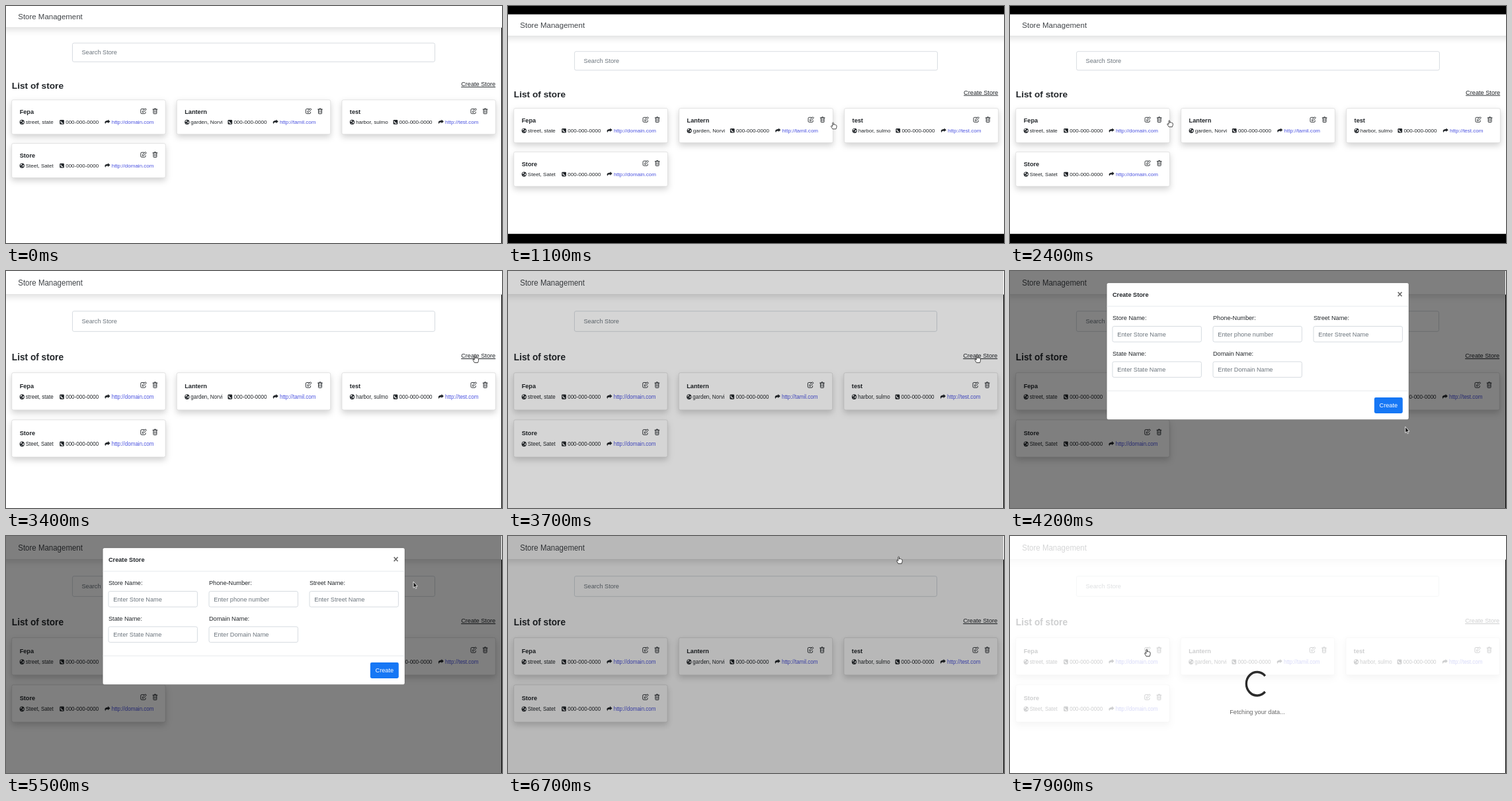
These frames come from a looping animation (750x358 px, 8 s). An HTML page:

```html
<!DOCTYPE html>
<html lang="en">
<head>
<meta charset="utf-8">
<title>Store Management</title>
<style>
  html, body { margin: 0; width: 100%; height: 100%; overflow: hidden; background: #000; }
  svg { display: block; width: 750px; height: 358px; }
  text { font: 9.2px "Liberation Sans", Arial, sans-serif; fill: #212529; }
  .bold { font-weight: bold; }
  .brand { font-size: 11.5px; fill: #404448; }
  .heading { font-size: 13.7px; font-weight: bold; }
  .small { font-size: 8.06px; }
  .url { fill: #4b53e0; }
  .hint { fill: #6c757d; }
  .field { fill: #fff; stroke: #ced4da; stroke-width: .8; }
  .header { fill: #fff; stroke: #d9dadb; stroke-width: .6; filter: drop-shadow(0 4px 4px #0000001c); }
  .card { fill: #fff; stroke: #d8d8d8; stroke-width: .7; filter: drop-shadow(0 4.6px 4.6px #0000002e); }
  .line { fill: none; stroke: #212529; stroke-linecap: round; stroke-linejoin: round; }
  .rule { stroke: #dee2e6; stroke-width: .7; }
  .cursor { stroke-width: .8; stroke-linejoin: round; }
</style>
</head>
<body>
<svg viewBox="0 0 750 358">
  <defs>
    <g id="globe">
      <circle r="3.6" fill="#212529"/>
      <path d="M-1.9-2.3L.2-2.7-.4-1.2-1.7-.2-2.6-1zM.8-.6L2.6-1 2.5.8 1.2 2.2.6.6zM-1.6 1L-.3 1.5-1 2.7z" fill="#fff"/>
    </g>
    <g id="phone">
      <rect x="-3.3" y="-3.4" width="6.7" height="6.7" rx="1.3" fill="#212529"/>
      <path d="M-1.6-1.7C-1.6.2-.2 1.7 1.8 1.7" fill="none" stroke="#fff" stroke-width="1.2"/>
    </g>
    <path id="share" fill="#212529" d="M.9-3.5L4.2-.6.9 2.2V.8C-1.6.7-3 1.2-2.8 3.3-5.2.2-3.4-2 .9-2z"/>
    <g id="edit" class="line">
      <path d="M1-3.3H-2.8Q-4.1-3.3-4.1-2V2.5Q-4.1 3.8-2.8 3.8H1.8Q3.1 3.8 3.1 2.5V1.4" stroke-width=".9"/>
      <path d="M-1.4 1.5L-1.2-.3 3-4 4.4-2.6.3 1.3z" stroke-width=".9"/>
    </g>
    <g id="trash" class="line" stroke-width=".9">
      <path d="M-3.4-2.7H3.4M-1.3-2.8L-.9-3.9H.9L1.3-2.8M-2.5-2.6V3.3Q-2.5 4-1.8 4H1.8Q2.5 4 2.5 3.3V-2.6"/>
      <path d="M-1-.9V2.3M1-.9V2.3" stroke-width=".7"/>
    </g>
  </defs>
  <g id="page">
    <rect width="750" height="360" fill="#fff"/>
    <g id="content"></g>
    <rect id="backdrop" width="750" height="360"/>
    <g id="modal"></g>
    <g id="loader">
      <rect width="750" height="360" fill="#fff" opacity=".78"/>
      <path id="spinner" fill="none" stroke="#2b2b2b" stroke-width="3.3"/>
      <text x="374.6" y="248.8" text-anchor="middle" style="fill:#666">Fetching your data...</text>
    </g>
    <g id="cursor" class="cursor">
      <path id="arrow" d="M0 0V8.6L2 6.9 3.4 9.8 4.8 9.2 3.5 6.4H6.1z" fill="#111" stroke="#fff"/>
      <path id="hand" d="M-.8.8Q0-.5.9.8V3.9L1.1 3Q2.2 2.6 2.7 3.6 3.9 3.1 4.3 4.1 5.5 4 5.5 5.2V7.2L4.5 10H-.6L-2.9 6.4Q-3.2 5-1.9 5.2L-.8 6.2z" fill="#fff" stroke="#222"/>
    </g>
  </g>
  <g id="bars">
    <rect width="750" height="12.6"/>
    <rect y="344.2" width="750" height="14"/>
  </g>
</svg>
<script>
const LOOP = 8000;
const $ = id => document.getElementById(id);
const clamp = v => Math.min(1, Math.max(0, v));
const progress = (t, start, length) => clamp((t - start) / length);
const easeOut = p => 1 - (1 - p) ** 2;
const smooth = p => p * p * (3 - 2 * p);

const label = (x, y, text, cls = '', extra = '') =>
  `<text x="${x}" y="${y}" class="${cls}" ${extra}>${text}</text>`;
const box = (x, y, w, h, cls, r = 2.3) =>
  `<rect x="${x}" y="${y}" width="${w}" height="${h}" rx="${r}" class="${cls}"/>`;
const icon = (name, x, y) => `<use href="#${name}" x="${x}" y="${y}"/>`;

// phoneX is where the phone block starts, measured from the card's left edge
function card(x, y, name, address, phoneX, url) {
  const row = y + 36.6;
  return box(x, y, 232.8, 52, 'card') +
    label(x + 12, y + 21.2, name, 'bold') +
    icon('edit', x + 199.5, y + 17) + icon('trash', x + 217, y + 17) +
    icon('globe', x + 15.6, y + 33.7) + label(x + 21.1, row, address, 'small') +
    icon('phone', x + phoneX + 3.4, y + 33.7) +
    label(x + phoneX + 9.1, row, '000-000-0000', 'small') +
    icon('share', x + phoneX + 72.3, y + 33.3) +
    label(x + phoneX + 78.7, row, url, 'small url');
}

$('content').innerHTML =
  box(-5, -5, 760, 37.6, 'header', 0) +
  label(18.3, 20.2, 'Store Management', 'brand') +
  box(100.6, 56.1, 548.8, 28.3, 'field') +
  label(114.6, 73.4, 'Search Store', 'hint') +
  label(8.8, 125.1, 'List of store', 'heading') +
  label(741.2, 121.1, 'Create Store', '', 'text-anchor="end" text-decoration="underline"') +
  card(8.7, 142, 'Fepa', 'street, state', 72.5, 'http://domain.com') +
  card(258.6, 142, 'Lantern', 'garden, Norvi', 77.2, 'http://tamil.com') +
  card(508.6, 142, 'test', 'harbor, sulmo', 77.7, 'http://test.com') +
  card(8.7, 207.8, 'Store', 'Steet, Satet', 72.5, 'http://domain.com');

const fields = [
  ['Store Name:', 'Enter Store Name'], ['Phone-Number:', 'Enter phone number'],
  ['Street Name:', 'Enter Street Name'], ['State Name:', 'Enter State Name'],
  ['Domain Name:', 'Enter Domain Name'],
];
const rule = y => `<path class="rule" d="M146.7 ${y}H603.8"/>`;

$('modal').innerHTML =
  `<rect x="146.5" y="16.6" width="457.3" height="190.9" rx="2.5" fill="#fff" stroke="#0005" stroke-width=".6"/>` +
  label(155.2, 35.8, 'Create Store', 'bold') +
  label(590.3, 37.2, '×', 'bold', 'text-anchor="middle" style="font-size:13.8px;fill:#666"') +
  rule(49.2) + rule(167.3) +
  fields.map(([name, hint], i) => {
    const x = 155.2 + i % 3 * 152.2, y = Math.floor(i / 3) * 49.4;
    return label(x, y + 68.8, name) + box(x, y + 77.2, 134.6, 21.8, 'field') +
      label(x + 7.4, y + 91.2, hint, 'hint');
  }).join('') +
  `<rect x="551.6" y="176.5" width="43" height="22.2" rx="2.3" fill="#1677f5"/>` +
  label(573.1, 190.7, 'Create', '', 'text-anchor="middle" style="fill:#fff"');

// time, x, y, shape
const route = [
  [700, 722, 48, 'arrow'], [1000, 560, 150, 'hand'], [1300, 300, 200, 'arrow'],
  [1500, 60, 150, 'hand'], [1900, 120, 225, 'hand'], [2200, 262, 190, 'arrow'],
  [2400, 240.8, 160, 'hand'], [2500, 240.8, 160, 'arrow'], [3250, 710, 118, 'hand'],
  [3950, 710, 118, 'arrow'], [4250, 590, 225, 'arrow'], [4700, 420, 150, 'arrow'],
  [5100, 400, 140, 'arrow'], [5500, 616.9, 63.8, 'arrow'], [6000, 600, 47, 'arrow'],
  [6150, 593, 34, 'hand'], [6400, 591.5, 28.6, 'hand'], [6750, 591.5, 28.6, 'arrow'],
  [7500, 206.9, 158, 'hand'], [LOOP, 206.9, 158, 'hand'],
];

function drawCursor(t) {
  const visible = t >= route[0][0];
  $('cursor').style.display = visible ? '' : 'none';
  if (!visible) return;
  const next = route.findIndex(key => key[0] > t);
  const [t0, x0, y0, shape] = route[next - 1], [t1, x1, y1] = route[next];
  const p = smooth(progress(t, t0, t1 - t0));
  $('cursor').setAttribute('transform', `translate(${x0 + (x1 - x0) * p} ${y0 + (y1 - y0) * p})`);
  for (const name of ['arrow', 'hand']) $(name).style.display = name === shape ? '' : 'none';
}

function drawSpinner(t) {
  const turn = (t - 7900) / 1000 * 2 * Math.PI, gap = .74;
  const point = a => `${374.2 + 16.4 * Math.cos(a)} ${206.3 + 16.4 * Math.sin(a)}`;
  $('spinner').setAttribute('d', `M${point(turn + gap)}A16.4 16.4 0 1 1 ${point(turn - gap)}`);
}

function draw(t) {
  const letterbox = t >= 100 && t < 2800;
  $('bars').style.display = letterbox ? '' : 'none';
  $('page').setAttribute('transform', letterbox ? 'translate(0 12.6)'
    : t < 100 ? 'scale(.9986)' : 'scale(.9986 1.082)');

  $('backdrop').setAttribute('opacity',
    .5 * (progress(t, 3652, 150) - progress(t, 6635, 150)));

  const shown = easeOut(progress(t, 3900, 300)) - easeOut(progress(t, 6510, 300));
  $('modal').setAttribute('opacity', progress(t, 3900, 150) - progress(t, 6510, 130));
  $('modal').setAttribute('transform', `translate(0 ${-28.8 * (1 - shown)})`);

  $('loader').setAttribute('opacity', progress(t, 7650, 250));
  drawSpinner(t);
  drawCursor(t);
}

function tick() {
  draw(performance.now() % LOOP);
  requestAnimationFrame(tick);
}
tick();
</script>
</body>
</html>
```
